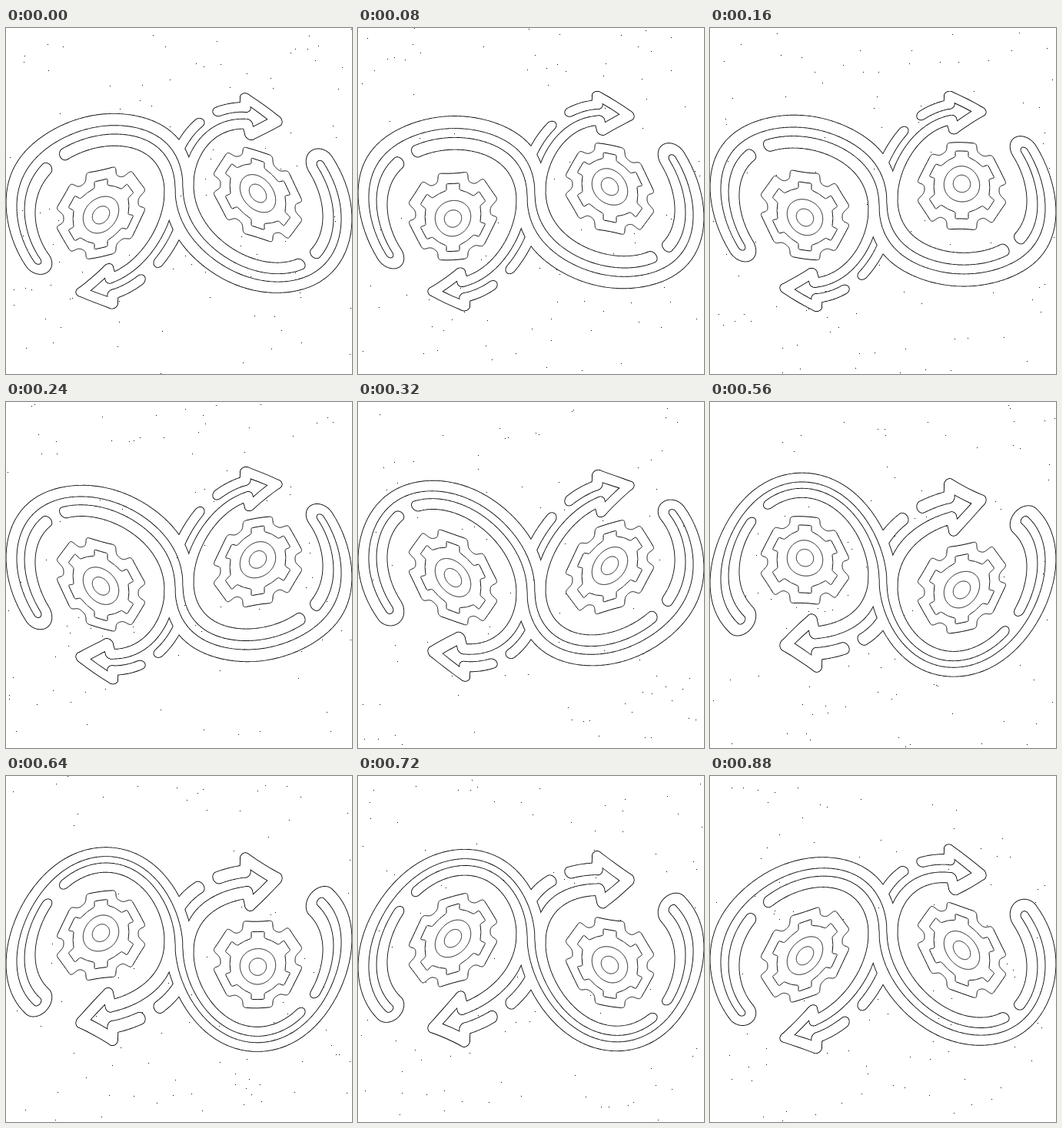
An HTML page with a canvas that plays this animation: 450x450 px, repeating every 0.96 s.

```html
<!DOCTYPE html>
<html lang="en">
<head>
<meta charset="utf-8">
<title>Waving infinity loop with gears</title>
<style>
  html, body { margin: 0; width: 100%; height: 100%; overflow: hidden; background: #fff; }
  canvas { display: block; }
</style>
</head>
<body>
<canvas id="stage" width="450" height="450"></canvas>
<script>
const ctx = document.getElementById('stage').getContext('2d');
const SIZE = 450, STEP_MS = 80, STEPS = 12;
const MID_Y = 225.3, LEFT_X = 122, RIGHT_X = SIZE - LEFT_X;
const HALF = 6.5, INNER = 91, OUTER = 115;
const INK = '#0a0a0a', PAPER = '#fff';
const rad = deg => deg * Math.PI / 180;

// Geometry in the undistorted plane

function arc(cx, cy, r, from, to) {
  const count = Math.max(6, Math.ceil(Math.abs(to - from) / 4));
  return Array.from({ length: count + 1 }, (_, i) => {
    const a = rad(from + (to - from) * i / count);
    return [cx + r * Math.cos(a), cy + r * Math.sin(a)];
  });
}

// Outline of a line with round ends
function tube(points) {
  const left = [], right = [], last = points.length - 1;
  let first = 0, end = 0;
  points.forEach(([x, y], i) => {
    const a = points[Math.max(0, i - 1)], b = points[Math.min(last, i + 1)];
    const angle = Math.atan2(b[1] - a[1], b[0] - a[0]);
    if (i === 0) first = angle * 180 / Math.PI;
    end = angle * 180 / Math.PI;
    const nx = -Math.sin(angle) * HALF, ny = Math.cos(angle) * HALF;
    left.push([x + nx, y + ny]);
    right.push([x - nx, y - ny]);
  });
  return [
    ...left,
    ...arc(...points[last], HALF, end + 90, end - 90),
    ...right.reverse(),
    ...arc(...points[0], HALF, first - 90, first - 270)
  ];
}

function roundCorners(points, radius) {
  const n = points.length;
  return points.flatMap((p, i) => {
    const toward = q => {
      const d = Math.hypot(q[0] - p[0], q[1] - p[1]);
      const k = Math.min(radius / d, 0.45);
      return [p[0] + (q[0] - p[0]) * k, p[1] + (q[1] - p[1]) * k];
    };
    const a = toward(points[(i + n - 1) % n]), b = toward(points[(i + 1) % n]);
    return [0, 0.25, 0.5, 0.75, 1].map(t => [0, 1].map(j =>
      (1 - t) ** 2 * a[j] + 2 * t * (1 - t) * p[j] + t * t * b[j]));
  });
}

// Repeats one tooth, given as [outward, sideways] points, six times
function gearOutline(cx, tooth, radius) {
  const points = [];
  for (let i = 0; i < 6; i++) {
    const c = Math.cos(rad(i * 60 - 90)), s = Math.sin(rad(i * 60 - 90));
    for (const [u, v] of tooth) points.push([cx + u * c - v * s, MID_Y + u * s + v * c]);
  }
  return roundCorners(points, radius);
}

const turn = shape => shape.map(([x, y]) => [SIZE - x, 2 * MID_Y - y]);
const leftArc = (r, from, to) => arc(LEFT_X, MID_Y, r, from, to);

// One S-shaped stroke: short inner arc, hairpin, outer arc, far inner arc
function loop(shortStart, farEnd) {
  const hairpin = 142;
  const [bend] = leftArc((INNER + OUTER) / 2, hairpin, hairpin);
  return [
    ...leftArc(INNER, shortStart, hairpin),
    ...arc(...bend, (OUTER - INNER) / 2, hairpin - 180, hairpin),
    ...leftArc(OUTER, hairpin, 360),
    ...arc(RIGHT_X, MID_Y, INNER, 180, farEnd)
  ];
}

const tip = [98, 329.5], wingTop = [132.5, 301], wingBottom = [138.5, 352.5];
const neckTop = [136.2, 315.2], neckBottom = [139, 338.8];

const arrow = [
  leftArc(INNER, 0, 81),
  leftArc(OUTER, 81.5, 63),
  leftArc(OUTER, 48, 26.5),
  [neckTop, wingTop],
  [wingTop, tip],
  [tip, wingBottom],
  [wingBottom, neckBottom]
].map(tube);
const ribbon = [
  tube(loop(220.5, 53.5)),
  turn(tube(loop(215, 60))),
  ...arrow,
  ...arrow.map(turn)
];

const gears = [LEFT_X + 1.5, RIGHT_X - 0.5].flatMap(cx => [
  gearOutline(cx, [[44.5, -20], [56.3, -19], [56.3, 19], [44.5, 20]], 4),
  gearOutline(cx, [[36, -8.5], [44, -8.5], [44, 8.5], [36, 8.5], [31.5, 18.2]], 1.5),
  arc(cx, MID_Y, 23.2, 0, 360),
  arc(cx, MID_Y, 11.2, 0, 360)
]);

// Travelling wave, strongest at mid height

function wave(x, y, step) {
  const strength = 23 * Math.cos(Math.PI * (y - MID_Y) / 360);
  return y + strength * Math.sin(2 * Math.PI * (x / 358 - (step - 0.13) / STEPS));
}

function trace(shape, step) {
  const PARTS = 4;
  ctx.beginPath();
  shape.forEach(([x, y], i) => {
    const [nx, ny] = shape[(i + 1) % shape.length];
    for (let k = 0; k < PARTS; k++) {
      const px = x + (nx - x) * k / PARTS, py = y + (ny - y) * k / PARTS;
      ctx.lineTo(px, wave(px, py, step));
    }
  });
  ctx.closePath();
}

function drawSpecks(step) {
  let seed = 7919 * (step + 1);
  const random = () => {
    seed = (Math.imul(seed, 1664525) + 1013904223) >>> 0;
    return seed / 4294967296;
  };
  ctx.fillStyle = INK;
  for (let i = 0; i < 115; i++) {
    ctx.fillRect(Math.floor(random() * SIZE), Math.floor(random() * SIZE), 1, 1);
  }
}

function draw(step) {
  ctx.fillStyle = PAPER;
  ctx.fillRect(0, 0, SIZE, SIZE);
  drawSpecks(step);

  ctx.strokeStyle = INK;
  ctx.lineJoin = 'round';
  ctx.lineWidth = 1.8;
  for (const shape of ribbon) { trace(shape, step); ctx.stroke(); }
  // Filling afterwards merges the overlapping parts
  ctx.fillStyle = PAPER;
  for (const shape of ribbon) { trace(shape, step); ctx.fill(); }

  ctx.lineWidth = 1;
  for (const shape of gears) { trace(shape, step); ctx.fill(); ctx.stroke(); }
}

const start = performance.now();
let shown = -1;
function tick() {
  const step = Math.floor((performance.now() - start) / STEP_MS) % STEPS;
  if (step !== shown) draw(shown = step);
  requestAnimationFrame(tick);
}
tick();
</script>
</body>
</html>
```
